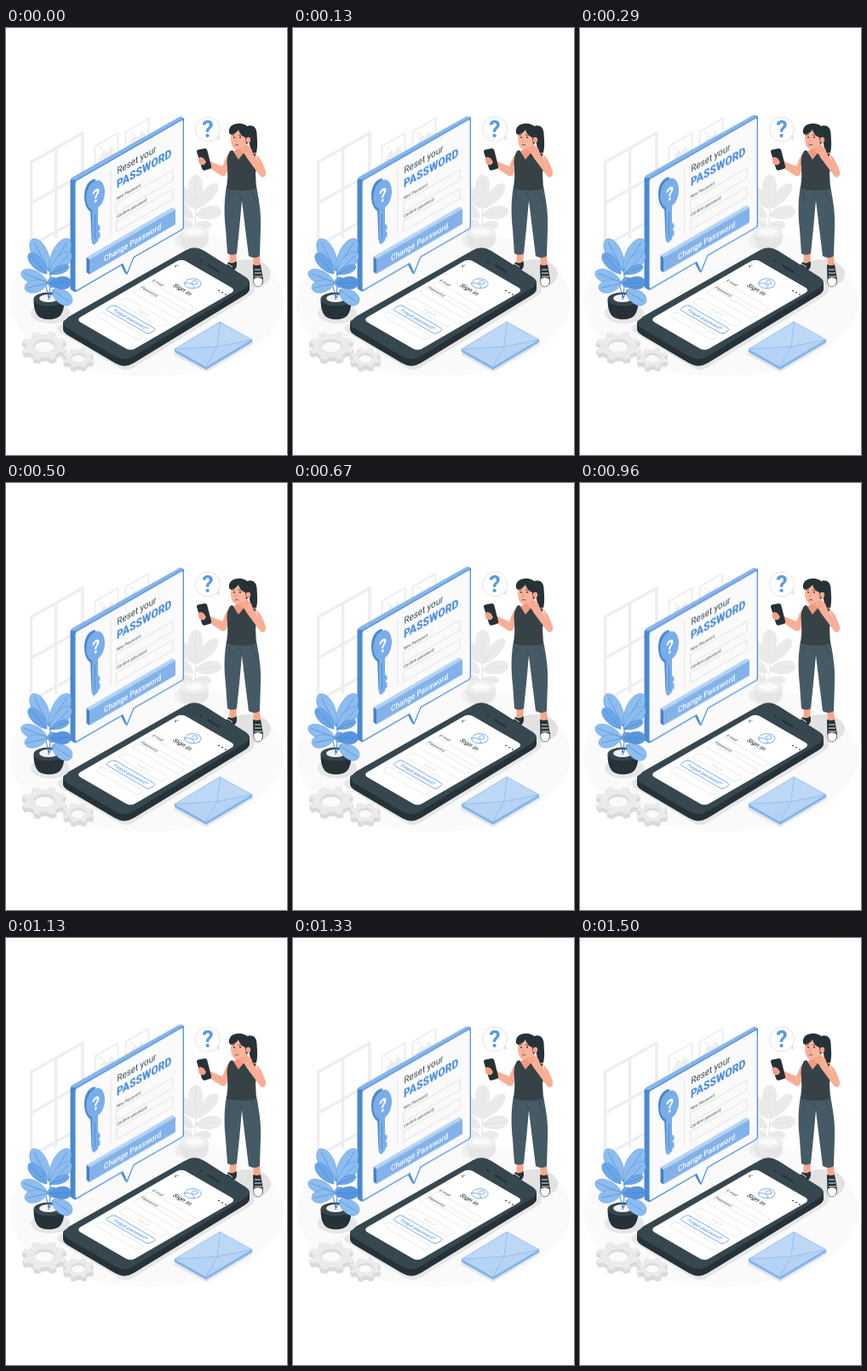
An HTML page that plays this animation: 330 by 500 pixels, repeating every 1.54 s.

```html
<!DOCTYPE html>
<html lang="en">
<head>
<meta charset="utf-8">
<title>Reset your password</title>
<style>
  html, body { margin: 0; width: 100%; height: 100%; overflow: hidden; background: #fff; }
  svg { display: block; width: 100%; height: 100%; }
  text { font-family: Roboto, Inter, sans-serif; fill: #37474f; }
  .mid { text-anchor: middle; }
  .line { fill: none; stroke-linecap: round; stroke-linejoin: round; }
  #panel { animation: hover 770ms cubic-bezier(.37, 0, .63, 1) -45ms infinite alternate; }
  @keyframes hover { to { transform: translateY(-6px); } }
</style>
</head>
<body>
<svg viewBox="0 0 330 500">
  <ellipse cx="165" cy="320" rx="161" ry="88" fill="#fafafa"/>

  <g id="wall" class="line" stroke="#eee" stroke-linejoin="miter">
    <path stroke-width="3.600" d="M29.500 257V157L90 123v110M58.500 141v104M29.500 205l60.500-34M29.500 255l60.500-34"/>
    <path stroke-width="2" d="M104.500 180v-41.500l27-15.500v40M140.500 160v-38.500l27-15.500v34"/>
    <g id="hill" stroke="none" fill="#efefef">
      <path d="M108 162v-7l7-13 4 4 4-8 5 5v16z"/><circle cx="112" cy="141" r="1.700"/>
    </g>
    <use href="#hill" x="36" y="-18"/>
  </g>

  <g id="greyPlant">
    <ellipse cx="218" cy="249" rx="20" ry="11" fill="#efefef"/>
    <g id="greyLeaves"></g>
    <path d="M204 239q0 17 9 19 8 2 16 0 9-2 9-19z" fill="#e6e6e6"/>
    <ellipse cx="221" cy="239" rx="17" ry="7.500" fill="#efefef"/>
    <ellipse cx="221" cy="238.500" rx="11" ry="4" fill="#fafafa"/>
  </g>

  <ellipse cx="284" cy="288" rx="27" ry="17" fill="#e2e2e2"/>

  <g id="woman">
    <path d="M281 116c7-4 13-1 13.500 7 .5 10 2 19-2.500 29-4-4-6-14-7-24z" fill="#263238"/>
    <path d="M263 263h8l-1 14-8 1zM290 265h8l1 14-8 1z" fill="#f7a58c"/>
    <path d="M261 274q5 3 9.500-1 1.500 5-1 9l-9 7q-7 3-11.500-.5l1-3q7-3 11-11.500z" fill="#263238"/>
    <path d="M290 277q5 2 9 0l3 17q0 8-5 8.500-5.500.5-6.500-7z" fill="#263238"/>
    <path d="M290.500 294q5-4 11 0 .5 8.500-5.500 9-5.500 0-5.500-9z" fill="#fff" stroke="#37474f" stroke-width=".6"/>
    <path d="M257 279l6 4M260 276l6 4M292 283h7M292 287h8M292 291h9" stroke="#fff" stroke-width=".9"/>
    <path d="M259 185h35c3 16 6 32 5 50l-1 32q-6 4-13 0l-4-32-4-33-3 33-3 29q-6 3-11 0l-2-28c-2-18-2-34 1-51z" fill="#455a64"/>
    <path d="M277 201l-3-8M262 191q2 7-1 12M289 190q1 9 5 13" class="line" stroke="#37474f" stroke-width=".8"/>

    <path d="M263 146c-5 4-6 10-9 16l-17-7-6 1 2 4 20 13c3 1 5 0 6-3l6-14z" fill="#f9ae95"/>
    <path d="M224 145q-.3-2 1.500-2.500l8-1.500q2 0 2.700 1.800l5 19.500q.2 2-2 2.700l-6 1.700q-2 .3-2.900-1.700z" fill="#263238"/>
    <path d="M225.500 152q4-2 7 1l2.500 4-2 3q-4 1-6-1z" fill="#f7a58c"/>
    <path d="M226 154l6 1M226 157l6 1" stroke="#e58b73" stroke-width=".6"/>

    <path d="M270 134h13l1 9 4 3-15 11-10-11 7-3z" fill="#f19a82"/>
    <path d="M263 144l3-1 7 11 9-11 4 1 6 4q4 12 1 22l1 18q-17 5-35 0 2-13 1-25-2-10 3-19z" fill="#374247"/>
    <path d="M289 146c8 2 12 10 16 22 1 5-2 8-6 6l-17-23-3-8 4-5 5 3 2 6 8 12c-3-5-5-8-4-13z" fill="#f9ae95"/>

    <path d="M265 119q-2 11 0 17 2 7 8 6 8-1 12-8l-1-15q-8-8-19 0z" fill="#fbb59d"/>
    <path d="M262 123c-1-6 3-11 10-11 8-1 16 4 16 13l-2 8-4 3-1-8c-4-1-7-5-8-9q-3 5-9 6z" fill="#263238"/>
    <ellipse cx="284.500" cy="131" rx="2.700" ry="3.300" fill="#f7a58c"/>
    <circle cx="268" cy="128" r=".9" fill="#263238"/><circle cx="275" cy="128" r=".9" fill="#263238"/>
    <path d="M266 125.500l2.500-.8M273 125l3 .8M269 137q2-1 4 0" class="line" stroke="#263238" stroke-width=".7"/>
    <path d="M271 128l-2 5h2" class="line" stroke="#e88b73" stroke-width=".7"/>
    <path d="M274 141l7-2 3-2 3 4-1 6-5 2-3-4z" fill="#f9ae95"/>
    <path d="M275 141l7-1M279 145l5-2" class="line" stroke="#e58b73" stroke-width=".6"/>
  </g>

  <g id="phone">
    <path id="phoneShade" fill="#e6e6e6"/>
    <g id="phoneBody"></g>
    <path d="M238 278l12 7.500" class="line" stroke="#263238" stroke-width="2.200"/>
    <circle cx="229" cy="272.500" r="1.400" fill="#263238"/>
    <g transform="matrix(.866 .5 -.866 .5 206 270)" font-size="4.900">
      <rect width="74" height="143" rx="6" fill="#fff"/>
      <path d="M6 10L4 12l2 2" class="line" stroke="#37474f" stroke-width=".9"/>
      <g fill="#37474f"><circle cx="63" cy="12" r=".9"/><circle cx="67.500" cy="12" r=".9"/><circle cx="72" cy="12" r=".9"/></g>
      <g class="line" stroke="#6ba5e6" stroke-width=".8">
        <circle cx="37" cy="21.500" r="8"/><circle cx="37" cy="19" r="3"/><path d="M31 27q1-4 6-4t6 4"/>
        <rect x="8" y="100" width="58" height="11" rx="3"/>
      </g>
      <g class="line" stroke="#e3e3e3" stroke-width=".7">
        <rect x="6" y="48.500" width="62" height="9" rx="1"/><rect x="6" y="64" width="62" height="9" rx="1"/>
        <rect x="8" y="83" width="58" height="11" rx="3"/><rect x="8" y="116" width="58" height="9" rx="3"/>
      </g>
      <text x="37" y="38" class="mid" font-size="7.700" font-weight="500">Sign in</text>
      <text x="6" y="46">E-mail</text>
      <text x="6" y="62">Password</text>
      <text x="37" y="90.500" class="mid" style="fill:#d0d0d0">Sign in</text>
      <text x="37" y="107.500" class="mid" font-size="5.600" font-weight="500" style="fill:#5b9be3">Forgot password?</text>
    </g>
  </g>

  <g id="envelope">
    <path d="M196 382l39 21 55-33v-4l-50-6z" fill="#e6e6e6"/>
    <path d="M198 376v3.500L235 400l54-32v-3.500L235 396z" fill="#82b3ea"/>
    <path d="M198 376l53-32 38 21-54 32z" fill="#bcd8f6"/>
    <path d="M198 376l50-3 41-8-54 32z" fill="#b4d3f5"/>
    <path d="M198 376l50-3 41-8M251.500 344.500L248 373l-13 23M198 376l53-32 38 21-54 32z" class="line" stroke="#86b6eb" stroke-width=".7"/>
  </g>

  <g id="gears"></g>

  <g id="panel">
    <path d="M133 274l7 13.500 2.500.5L150 268z" fill="#4a86cb"/>
    <path d="M75.500 179q0-2.500 2.500-4L203.500 104.500q2-1 3.500 0l2 1.500v128l-127 75q-1 .5-2.500-.500l-3-2q-1-.7-1-2.500z" fill="#4b88cf"/>
    <path d="M76 177.500q.5-1.500 2-2.500L203.500 104.500q2-1 3.500 0l1.500 1.200L82 178z" fill="#86b5ea"/>
    <path d="M81 182q0-2.500 2-3.700L205.500 108q2.800-1.300 2.800 1.700V233q0 2-2 3.200L150 268.500 142 288l-5-11.500L84 307q-3 1.500-3-1.500z" fill="#fafafa" stroke="#4f91dd" stroke-width="1.200"/>

    <path d="M123 166v77" stroke="#dfdfdf" stroke-width=".8"/>
    <g class="line" stroke="#dcdcdc" stroke-width=".8">
      <path id="field" d="M130 204.500l66-38v12l-66 38z"/><use href="#field" y="22"/>
    </g>
    <g id="labels">
      <text transform="matrix(.866 -.5 0 1 130.500 171.500)" font-size="11.300">Reset your</text>
      <text transform="matrix(.866 -.5 0 1 130 188)" font-size="13.900" font-weight="900" style="fill:#4f91dd">PASSWORD</text>
      <text transform="matrix(.866 -.5 0 1 130 201.500)" font-size="4.850">New Password</text>
      <text transform="matrix(.866 -.5 0 1 130 223)" font-size="5.050">Confirm password</text>
    </g>

    <g id="key">
      <path d="M99 210h5v42l-3.500-3zM92 197c0-12 6-20 13-20l2 39c-9 2-15-6-15-19z" fill="#4a86cb"/>
      <path d="M101 212l7-3v21l2.500 2v4l-2 2 2 2v5l-2 1.500-.5 3-4.500 4.500-2.500-2z" fill="#78ade9"/>
      <ellipse cx="105" cy="195.500" rx="10.500" ry="17.500" transform="rotate(12 105 196)" fill="#78ade9"/>
      <path d="M104.500 218v29" stroke="#5590d6" stroke-width="1"/>
      <text transform="matrix(.866 -.5 0 1 105.500 204)" class="mid" font-size="21" font-weight="700" style="fill:#fff">?</text>
    </g>

    <g id="button">
      <path d="M94.500 268.500L195.500 210l3.500 2.500L98 271z" fill="#b4d3f5"/>
      <path d="M94.500 268.500L98 271v17.500L94.500 286z" fill="#4780c4"/>
      <path d="M98 271l101-58.500V230L98 288.500z" fill="#82b2e9"/>
      <text transform="matrix(.866 -.5 0 1 115 274)" font-size="9.600" font-weight="500" style="fill:#fff">Change Password</text>
    </g>
  </g>

  <g id="bluePlant">
    <ellipse cx="52" cy="334" rx="23" ry="12" fill="#e6e6e6"/>
    <path d="M32.500 318q0 19 10 22 8 2.500 16 0 10-3 10-22z" fill="#263238"/>
    <ellipse cx="50.500" cy="317.500" rx="18" ry="8" fill="#37474f"/>
    <ellipse cx="50" cy="316.500" rx="11" ry="4.500" fill="#f2f2f2"/>
    <g id="blueLeaves"></g>
  </g>

  <g id="bubble">
    <path d="M246 128l5 3.500-1-8z" fill="#e0e0e0"/>
    <circle cx="237" cy="118.500" r="14.500" fill="#fff" stroke="#e3e3e3"/>
    <text x="237" y="128" class="mid" font-size="27" font-weight="700" style="fill:#5b9be3">?</text>
  </g>
</svg>
<script>
  const $ = id => document.getElementById(id);

  // Polygon path with rounded corners
  function rounded(pts, r) {
    const n = pts.length;
    const toward = ([x, y], [u, v]) => {
      const k = Math.min(.5, r / Math.hypot(u - x, v - y));
      return [x + (u - x) * k, y + (v - y) * k];
    };
    return pts.map((p, i) =>
      `${i ? 'L' : 'M'}${toward(p, pts[(i + n - 1) % n])}Q${p} ${toward(p, pts[(i + 1) % n])}`).join('') + 'z';
  }

  // Flat shape with a solid side below it
  function extrude(d, depth, top, side) {
    let out = '';
    for (let dy = depth; dy >= 0; dy--) {
      out += `<path d="${d}" transform="translate(0 ${dy})" fill="${dy ? side : top}"/>`;
    }
    return out;
  }

  const slab = rounded([[61.5, 345], [222, 254], [291.5, 298], [139, 391]], 13);
  $('phoneBody').innerHTML = extrude(slab, 8, '#37474f', '#263238');
  $('phoneShade').setAttribute('d', rounded(
    [[56, 352], [222, 256], [291, 302], [293, 310], [141, 403]], 10));

  function leaf(x, y, tx, ty, w, fill, vein) {
    const dx = tx - x, dy = ty - y, len = Math.hypot(dx, dy);
    const at = (k, side) => [x + dx * k - dy / len * w * side, y + dy * k + dx / len * w * side];
    return `<path d="M${x} ${y}C${at(.3, 1)} ${at(.95, 1)} ${tx} ${ty}C${at(.95, -1)} ${at(.3, -1)} ${x} ${y}z"
      fill="${fill}" stroke="${vein}" stroke-width=".4"/>
      <path d="M${x} ${y}L${at(.9, 0)}" stroke="${vein}" stroke-width=".6"/>`;
  }
  const stem = (d, color) => `<path d="${d}" class="line" stroke="${color}" stroke-width="1"/>`;

  const sky = '#8dbdf0', mid = '#6ba6e8', deep = '#5795de', rib = '#4583ca';
  $('blueLeaves').innerHTML = stem('M50 318Q54 298 51 278M50 316Q47 300 44 294M51 316Q56 304 62 302', rib) +
    leaf(51, 285, 31, 247, 12, sky, rib) + leaf(51, 284, 74, 247, 12, sky, rib) +
    leaf(48, 288, 27, 264, 9, mid, rib) +
    leaf(51, 289, 76, 263, 10, sky, rib) + leaf(52, 288, 74, 279, 6, mid, rib) +
    leaf(49, 298, 18, 286, 10, sky, rib) + leaf(49, 299, 22, 305, 10, sky, rib) +
    leaf(63, 299, 49, 297, 8, mid, rib) + leaf(51, 299, 77, 298, 10, deep, rib) +
    leaf(54, 307, 77, 322, 11, sky, rib);

  const grey = '#ebebeb', ash = '#e0e0e0';
  $('greyLeaves').innerHTML = stem('M221 240Q224 215 222 195M221 240Q216 220 210 212', ash) +
    leaf(222, 206, 223, 172, 11, grey, ash) + leaf(222, 212, 248, 183, 9, grey, ash) +
    leaf(221, 211, 203, 186, 9, grey, ash) + leaf(222, 219, 253, 214, 10, grey, ash) +
    leaf(220, 222, 197, 207, 9, grey, ash) + leaf(222, 230, 241, 231, 6, grey, ash) +
    leaf(219, 231, 198, 226, 7, grey, ash);

  // Flat cog seen at an angle
  function gear(cx, cy, rx, ry, teeth) {
    let d = '';
    for (let i = 0; i < teeth; i++) {
      [[0, .78], [.2, .8], [.28, 1], [.64, 1], [.74, .8]].forEach(([f, k]) => {
        const a = (i + f) / teeth * 2 * Math.PI;
        d += `${d ? 'L' : 'M'}${(cx + rx * k * Math.cos(a)).toFixed(1)} ${(cy + ry * k * Math.sin(a)).toFixed(1)}`;
      });
    }
    return extrude(d + 'z', 5, '#ebebeb', '#dadada') +
      `<ellipse cx="${cx}" cy="${cy}" rx="${rx * .46}" ry="${ry * .46}" fill="#dadada"/>
       <ellipse cx="${cx}" cy="${cy + 1.5}" rx="${rx * .42}" ry="${ry * .36}" fill="#fafafa"/>`;
  }
  $('gears').innerHTML = gear(45, 372, 27, 17, 8) + gear(85, 386, 18.5, 12, 8);
</script>
</body>
</html>
```
